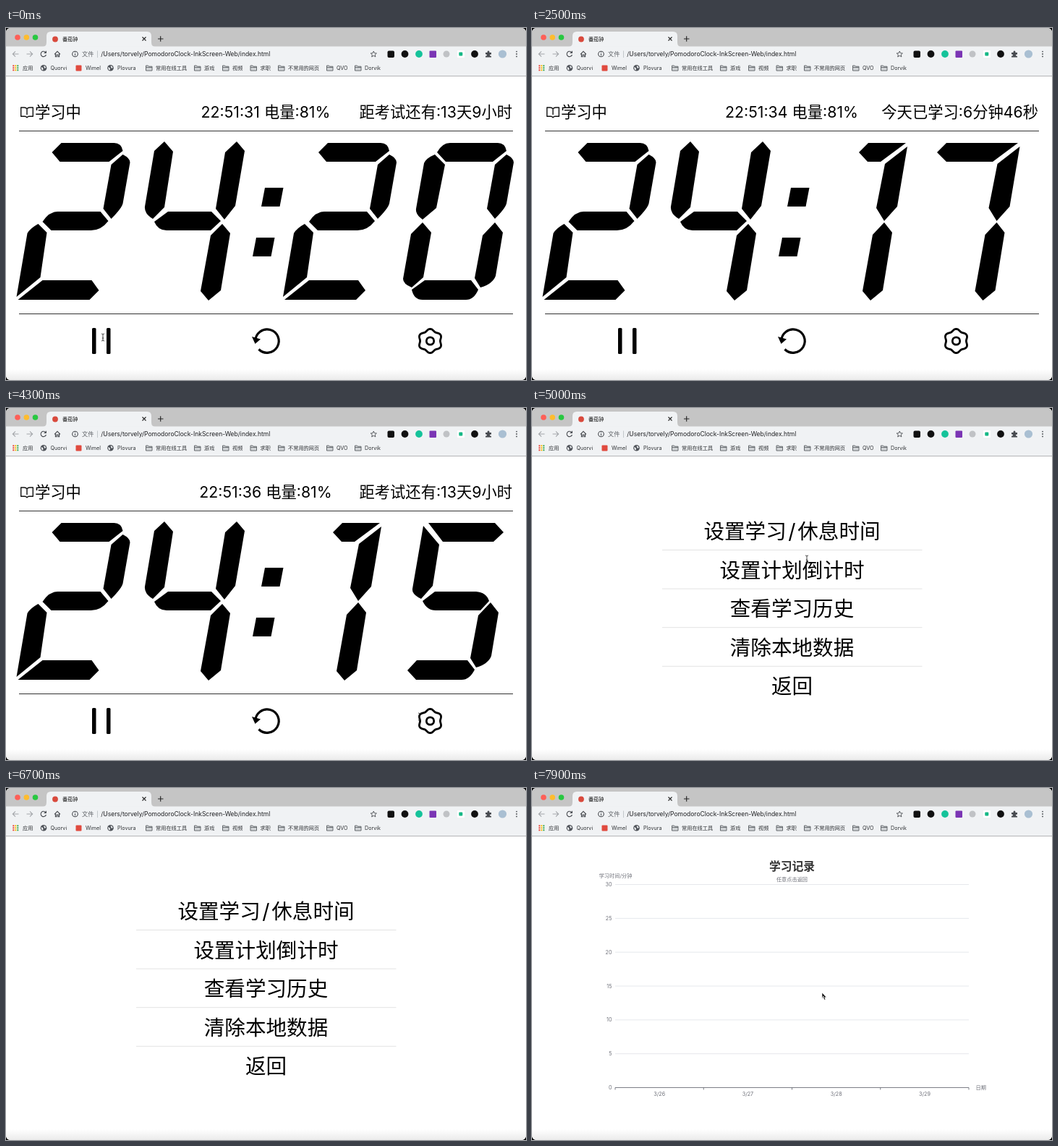
Recreate the animation shown at these times as an HTML page. Size 719 by 487 pixels, loop 8000 ms.

```html
<!DOCTYPE html>
<html lang="zh-CN">
<head>
<meta charset="utf-8">
<title>番茄钟</title>
<style>
html, body { margin: 0; width: 100%; height: 100%; overflow: hidden; background: #000; }
svg { display: block; width: 719px; height: 487px; font-family: Inter, "Noto Sans CJK SC", "Noto Sans CJK", sans-serif; }
.line { fill: none; stroke: #484b50; stroke-width: 1.1; }
.folder { fill: #d3d6d9; stroke: #5a5e63; stroke-width: .9; }
.ui { font-size: 7.2px; fill: #303336; }
.head { font-size: 21.3px; }
.menu { font-size: 28.6px; text-anchor: middle; }
.axis { font-size: 7.2px; fill: #6e7079; }
.mid { text-anchor: middle; }
.end { text-anchor: end; }
</style>
</head>
<body>
<svg viewBox="0 0 719 487">
  <defs>
    <clipPath id="window"><rect width="719" height="487" rx="6"/></clipPath>
    <linearGradient id="shade" x2="0" y2="1">
      <stop stop-color="#fff"/><stop offset="1" stop-color="#ebebeb"/>
    </linearGradient>
  </defs>
  <g clip-path="url(#window)">
    <rect width="719" height="487" fill="#fff"/>
    <rect y="472" width="719" height="15" fill="url(#shade)"/>
    <g id="chrome">
      <rect width="719" height="26" fill="#c5c5c5"/>
      <path d="M50 26Q56 26 56 20V11Q56 5 62 5H195Q201 5 201 11V20Q201 26 207 26Z" fill="#f0f2f4"/>
      <rect y="25.5" width="719" height="41" fill="#f0f2f4"/>
      <path d="M0 66.5H719" stroke="#b4b6b8"/>
      <circle cx="16" cy="13" r="3.8" fill="#fe5f57"/>
      <circle cx="28.3" cy="13" r="3.8" fill="#febc2e"/>
      <circle cx="40.5" cy="13" r="3.8" fill="#28c840"/>
      <circle cx="68" cy="15.5" r="3.9" fill="#d94a3d"/>
      <text x="78" y="18" font-size="7.1" font-weight="500">番茄钟</text>
      <path class="line" style="stroke:#222" d="M188.5 12.5L193.5 17.5M193.5 12.5L188.5 17.5M210 15H217.5M213.7 11.3V18.8"/>
      <path class="line" style="stroke:#a5a8ac" d="M17.5 36H9.5M13 32.3L9.3 36L13 39.7M28.5 36H36.5M33 32.3L36.7 36L33 39.7"/>
      <path class="line" d="M54.8 33.7A3.7 3.7 0 1 0 55.4 37M55.4 31.8V34.4H52.6M67 36.4L71 32.4L75 36.4M68.4 35.5V39.7H70V37H72V39.7H73.6V35.5"/>
      <circle class="line" cx="95.5" cy="36" r="3.8"/>
      <path class="line" d="M95.5 35.5V38.3M95.5 33.6V34.5"/>
      <text x="105" y="39" font-size="8.2" fill="#5f6368">文件</text>
      <path d="M126.5 31.5V41" stroke="#b8bbbf" stroke-width=".8"/>
      <text x="131.3" y="39" font-size="8.5" fill="#202124">/Users/torvely/PomodoroClock-InkScreen-Web/index.html</text>
      <path class="line" style="stroke-width:.9" d="M508.3 32L509.5 34.8L512.4 35L510.2 37L510.9 39.9L508.3 38.3L505.7 39.9L506.4 37L504.2 35L507.1 34.8Z"/>
      <path d="M663 34H665.5Q665.3 31.6 667 31.6T668.5 34H671V36.4Q668.8 36.3 668.8 37.6T671 39V40.5H663V38.8Q665 38.8 665 37.5T663 36.2Z" fill="#484b50"/>
    </g>
    <g id="clock">
      <path d="M18 142.5H701M18 395.5H701" stroke="#333"/>
      <path d="M29 112Q28 110 25 110H20.7V122.3H26Q28 122.3 29 124Q30 122.3 32 122.3H37.3V110H33Q30 110 29 112V120" fill="none" stroke="#111" stroke-width="1.4" stroke-linejoin="round"/>
      <g class="head">
        <text x="40" y="124">学习中</text>
        <text id="now" class="mid" x="359" y="124"></text>
        <text id="note" class="end" x="700" y="124"></text>
      </g>
      <g id="digits">
        <path d="M358 221H383.5L378.5 247H353ZM346 290H371.5L366.5 316H341Z"/>
      </g>
      <rect x="119" y="415" width="5.5" height="36" rx="1.5"/>
      <rect x="139" y="415" width="5.5" height="36" rx="1.5"/>
      <path d="M344.8 433A16.2 16.2 0 1 1 349.5 444.5" fill="none" stroke="#000" stroke-width="3.2"/>
      <path d="M340 427L352 430.5L344.5 437Z"/>
      <g fill="none" stroke="#000" stroke-width="2.8">
        <path id="gear"/>
        <circle cx="586.5" cy="433" r="5.2"/>
      </g>
    </g>
    <g id="menu"></g>
    <g id="chart">
      <text class="mid" x="359.5" y="114" font-size="15.8" font-weight="700" fill="#333">学习记录</text>
      <text class="axis mid" x="359.5" y="128.5">任意点击返回</text>
      <text class="axis mid" x="115.5" y="123.5">学习时间/分钟</text>
      <text class="axis" x="613.5" y="417">日期</text>
    </g>
    <path id="beam" d="M-2-5Q0-5 0-3.6Q0-5 2-5M0-3.6V3.6M-2 5Q0 5 0 3.6Q0 5 2 5M-1.2 1H1.2" fill="none" stroke="#333" stroke-width=".9"/>
    <path id="arrow" d="M0-5V4.2L2-.2V2.6L3.4 5.2L4.8 4.5L3.6 1.8H6.2Z" fill="#000" stroke="#fff" stroke-width=".7"/>
  </g>
</svg>
<script>
const LOOP = 8000, MENU_AT = 4450, CHART_AT = 7500, FIRST_TICK = 150;
const $ = id => document.getElementById(id);

function add(parent, tag, attrs, text) {
  const node = document.createElementNS('http://www.w3.org/2000/svg', tag);
  for (const key in attrs) node.setAttribute(key, attrs[key]);
  if (text) node.textContent = text;
  return parent.appendChild(node);
}

function buildChrome() {
  const bar = $('chrome');
  const disc = (cx, cy, r, fill) => add(bar, 'circle', { cx, cy, r, fill });
  const square = (x, y, size, fill, rx = 1) => add(bar, 'rect', { x, y, width: size, height: size, rx, fill });
  const label = (x, text) => add(bar, 'text', { class: 'ui', x, y: 57.8 }, text);

  square(527.5, 31.5, 9.5, '#111', 2);
  disc(551.5, 36, 4.9, '#111');
  disc(571, 36, 4.9, '#15c39a');
  square(585.5, 31.5, 9.5, '#7b35b4');
  disc(609, 36, 4.5, '#c0c2c5');
  square(624, 31, 10, '#fff');
  square(626.3, 33.5, 5, '#16b886');
  disc(648, 36, 4.9, '#111');
  disc(686.5, 36, 5.6, '#a9bfd2');
  for (const y of [32.6, 36, 39.4]) disc(706, y, .9, '#484b50');

  const dots = ['#ea4335', '#fbbc04', '#34a853', '#4285f4'];
  for (let i = 0; i < 9; i++) {
    const row = Math.floor(i / 3);
    square(9.3 + i % 3 * 3, 51.3 + row * 3, 2, dots[(i + row) % 4], .4);
  }
  label(23, '应用');

  for (const [x, name] of [[52, 'Quorvi'], [144.5, 'Plovura']]) {
    disc(x, 55.3, 4.3, '#50545a');
    add(bar, 'path', { d: `M${x - 3.2} 54Q${x} 55 ${x - .6} 57.5L${x - 1.5} 58.5Q${x - 3.5} 57 ${x - 3.2} 54ZM${x} 52Q${x + 2.8} 52.5 ${x + 3.2} 55L${x + 1.2} 55.8Z`, fill: '#f0f2f4' });
    label(x + 9.5, name);
  }
  square(96.5, 51.5, 8, '#e04a3f');
  label(110, 'Wimel');

  const folders = [[193, '常用在线工具'], [260, '游戏'], [299, '视频'], [337.5, '求职'],
    [376, '不常用的网页'], [443, 'QVO'], [482, 'Dorvik']];
  for (const [x, name] of folders) {
    add(bar, 'path', { class: 'folder', d: `M${x + .5} 52H${x + 3.5}L${x + 4.5} 53.2H${x + 9}V59H${x + .5}ZM${x + .5} 54.6H${x + 9}` });
    label(x + 14, name);
  }
}

// Segments of the slanted display, laid out in the last digit's cell.
const seg = {
  a: 'M596 172Q603 159 614 159H680Q690 159 692 170L673 185H608Z',
  aLeft: 'M594 172L607 159H680Q690 159 692 170L673 185H605Z',
  aRight: 'M596 172Q603 159 614 159H682L694 172L680 185H608Z',
  b: 'M692 175Q702 180 702 186L692 243Q690 250 676 264L665 250L676 189Z',
  c: 'M676 269L687 283L677 343Q673 354 656 359L648 346L659 287Z',
  d: 'M561 362L579 349H643L653 362Q647 376 636 376H576Q564 376 561 362Z',
  dLeft: 'M561 363L574 349H644L654 362Q647 376 636 376H573Z',
  e: 'M576 269L588 283L577 345L561 359Q549 354 549 347L560 285Z',
  f: 'M593 175L607 189L595 249L576 265Q566 258 567 250L578 187Q581 180 593 175Z',
  g: 'M581 267L597 254H661L672 267L655 280H593Z'
};
const stem = 'M519 164L505 247L487 267L476 249L488 188ZM487 269L498 283L485 363L468 377L457 364L471 286Z';
const join = keys => keys.split(' ').map(k => seg[k]).join('');
const glyph = {
  0: [0, join('a b c d e f')],
  1: [155.5, 'M452 172L465 159H517L482 185H464Z' + stem],
  2: [0, join('aLeft b') + 'M581 268Q590 254 602 254H661L672 267Q662 280 648 280H593ZM575 271L587 283L578 345L545 372L560 284Q564 277 575 271ZM581 349H649L659 363L646 376H547Z'],
  4: [374, 'M219 157L231 171L219 248L203 264Q191 257 192 247L205 170ZM205 268L224 254H284L297 267L283 280H222Q210 280 205 268ZM319 157L330 170L317 246L302 265L290 250L303 172ZM299 271L310 284L297 363L280 377L269 364L283 287Z'],
  5: [-6, join('c dLeft') + 'M590 159H682L694 172L680 185H610ZM583 163L605 189L596 246L580 264Q567 258 568 250ZM582 267L599 254H656Q670 255 674 267L662 280H600Q588 280 582 267Z'],
  7: [155.5, 'M404.5 172L417.5 159H516.5L481.5 185H417.5Z' + stem],
  6: [0, join('aRight c d e f g')],
  8: [0, join('a b c d e f g')],
  9: [-6, join('a b c dLeft f g')]
};

const cells = [0, 1, 2, 3].map(() => add($('digits'), 'path', {}));
function setDigit(i, n) {
  const cellX = [-530.5, -374, n === 1 ? -155.5 : -162, 0][i];
  cells[i].setAttribute('d', glyph[n][1]);
  cells[i].setAttribute('transform', `translate(${glyph[n][0] + cellX} 0)`);
}

function buildGear() {
  let d = '';
  for (let deg = 0; deg < 360; deg += 5) {
    const angle = deg * Math.PI / 180, r = 15.3 - 1.4 * Math.cos(6 * angle);
    d += `${deg ? 'L' : 'M'}${586.5 + r * Math.cos(angle)} ${433 + r * Math.sin(angle)}`;
  }
  $('gear').setAttribute('d', d + 'Z');
}

function buildMenu() {
  ['设置学习\u200a/\u200a休息时间', '设置计划倒计时', '查看学习历史', '清除本地数据', '返回'].forEach((name, i) => {
    const y = 181 + i * 53.6;
    add($('menu'), 'text', { class: 'menu', x: 359.5, y }, name);
    if (i < 4) add($('menu'), 'path', { d: `M180 ${y + 15.5}H539.5`, stroke: '#e3e3e3' });
  });
}

function buildChart() {
  const chart = $('chart');
  for (let i = 0; i <= 6; i++) {
    const y = 414.5 - i * 46.83;
    add(chart, 'path', { d: `M115 ${y}H604`, stroke: i ? '#e4e6ea' : '#6e7079', 'stroke-width': .9 });
    add(chart, 'text', { class: 'axis end', x: 110.5, y: y + 2.5 }, String(i * 5));
  }
  for (let i = 0; i <= 4; i++) {
    const x = 115 + i * 122.25;
    add(chart, 'path', { d: `M${x} 414.5V417.5`, stroke: '#6e7079', 'stroke-width': .9 });
    if (i < 4) add(chart, 'text', { class: 'axis mid', x: x + 61.2, y: 425.6 }, `3/${26 + i}`);
  }
}

// time, x, y
const pointer = [[0, 134, 428], [250, 140, 431], [900, 490, 160], [1200, 534, 116], [2500, 556, 122],
  [3500, 562, 180], [4300, 572, 427], [4500, 577, 430], [5000, 380, 209], [6700, 387, 220],
  [7300, 396, 275], [7900, 401, 288], [LOOP, 401, 288]];

function pointerAt(t) {
  const i = pointer.findIndex(p => p[0] > t);
  const [t0, x0, y0] = pointer[i - 1], [t1, x1, y1] = pointer[i];
  const u = (t - t0) / (t1 - t0), k = u * u * (3 - 2 * u);
  return `translate(${x0 + (x1 - x0) * k} ${y0 + (y1 - y0) * k})`;
}

const show = (id, on) => $(id).setAttribute('display', on ? 'inline' : 'none');

function render(t) {
  const page = t < MENU_AT ? 'clock' : t < CHART_AT ? 'menu' : 'chart';
  for (const id of ['clock', 'menu', 'chart']) show(id, id === page);
  const ticks = Math.min(5, Math.max(0, Math.floor((t - FIRST_TICK) / 1000) + 1));
  const left = 20 - ticks;
  [2, 4, Math.floor(left / 10), left % 10].forEach((n, i) => setDigit(i, n));
  $('now').textContent = `22:51:${31 + ticks} 电量:81%`;
  $('note').textContent = t >= 1900 && t < 3900 ? `今天已学习:6分钟${43 + ticks}秒` : '距考试还有:13天9小时';
  for (const id of ['beam', 'arrow']) $(id).setAttribute('transform', pointerAt(t));
  show('beam', page !== 'chart');
  show('arrow', page === 'chart');
}

buildChrome();
buildGear();
buildMenu();
buildChart();
const start = performance.now();
function frame() {
  render((performance.now() - start) % LOOP);
  requestAnimationFrame(frame);
}
frame();
</script>
</body>
</html>
```
